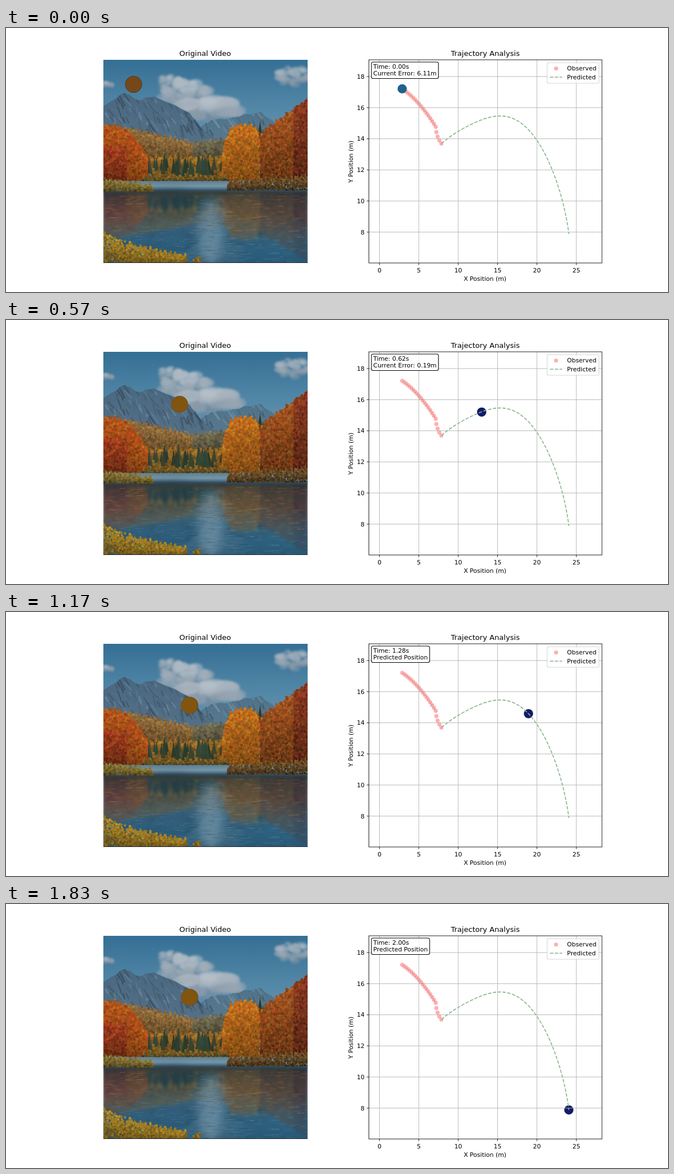
These frames come from a looping animation (1183x473 px, 1.86 s). An HTML page with a canvas:

```html
<!DOCTYPE html>
<html lang="en">
<head>
<meta charset="utf-8">
<title>Trajectory Analysis</title>
<style>
html, body { margin: 0; width: 100%; height: 100%; overflow: hidden; background: #fff; }
canvas, svg { position: absolute; left: 0; top: 0; }
#photo { left: 174px; top: 57px; }
text { font-family: "DejaVu Sans", sans-serif; font-size: 10.95px; fill: #000; }
.title { font-size: 13.14px; }
.mid { text-anchor: middle; }
.end { text-anchor: end; }
</style>
</head>
<body>
<canvas id="photo" width="365" height="364"></canvas>
<svg id="plot" width="1183" height="473" viewBox="0 0 1183 473"></svg>
<script>
const STEP = 30, FRAMES = 62;
const PX_X = 14.07, PX_Y = 27.87;          // pixels per metre
const LEFT = 174, RIGHT = 539, TOP = 57, BOTTOM = 421;
const plot = document.getElementById('plot');

/* ---------- landscape ---------- */
const photo = document.getElementById('photo');
const c = photo.getContext('2d');
c.translate(-LEFT, -TOP);
let seed = 7;
const rnd = () => (seed = (seed * 16807) % 2147483647) / 2147483647;
const between = (a, b) => a + (b - a) * rnd();
const repeat = (n, fn) => { for (let i = 0; i < n; i++) fn(i); };

function band(y0, y1, ...stops) {
  const g = c.createLinearGradient(0, y0, 0, y1);
  stops.forEach((s, i) => g.addColorStop(i / (stops.length - 1), s));
  c.fillStyle = g;
  c.fillRect(LEFT, y0, RIGHT - LEFT, y1 - y0);
}
function disc(x, y, rx, ry, fill) {
  c.fillStyle = fill;
  c.beginPath();
  c.ellipse(x, y, rx, ry, 0, 0, 7);
  c.fill();
}
function soft(px, draw) {
  c.save();
  c.filter = `blur(${px}px)`;
  draw();
  c.restore();
}
function cloud(x, y, rx, ry) {
  repeat(50, () => {
    const a = rnd() * 6.283, r = Math.sqrt(rnd());
    const dy = ry * r * Math.sin(a), s = between(.12, .3) * rx;
    const l = 66 - 9 * dy / ry + between(-4, 4);
    disc(x + rx * r * Math.cos(a), y + dy, s, s * .6, `hsl(208 15% ${l}% / .6)`);
  });
}
// A jagged slope through a few summits, scored with light and dark gullies.
function mountain(summits, base, hue, light) {
  c.save();
  c.beginPath();
  c.moveTo(summits[0][0], base);
  summits.forEach(([x, y], i) => {
    const [px, py] = summits[i - 1] || [x, y];
    for (let u = .2; u < 1; u += .2) c.lineTo(px + (x - px) * u, py + (y - py) * u + between(-2, 2));
    c.lineTo(x, y);
  });
  c.lineTo(summits.at(-1)[0], base);
  c.clip();
  band(summits[0][1] - 40, base, `hsl(${hue} 28% ${light}%)`, `hsl(${hue} 22% ${light + 5}%)`);
  repeat(260, () => {
    const x = between(summits[0][0], summits.at(-1)[0]), y = between(110, base), l = between(6, 22);
    c.strokeStyle = `hsl(${hue} 24% ${light + between(-15, 17)}% / .55)`;
    c.lineWidth = between(1, 4);
    c.beginPath();
    c.moveTo(x, y);
    c.lineTo(x + l * between(.2, .9), y + l);
    c.stroke();
  });
  c.restore();
}
// Foliage dabs between a crown line and the ground, darker towards the ground.
function grove(x0, x1, crown, base, hue, sat = 68, light = 40, size = 2.3) {
  const count = (x1 - x0) * (base - crown((x0 + x1) / 2)) / 3;
  repeat(count, () => {
    const x = between(x0, x1), top = crown(x) + 3 * Math.sin(x * .7) + 2 * Math.sin(x * 1.7);
    const depth = rnd(), l = light - 14 * depth + between(-7, 7);
    disc(x, top + (base - top) * depth, size * between(.6, 1.2), size, `hsl(${hue + between(-7, 7)} ${sat}% ${l}%)`);
  });
}
function conifer(x, base, h) {
  c.fillStyle = `hsl(${between(70, 170)} 18% ${between(18, 26)}%)`;
  c.beginPath();
  c.moveTo(x - h * .16, base);
  c.lineTo(x, base - h);
  c.lineTo(x + h * .16, base);
  c.fill();
}
function ripples(x0, x1, y0, y1, count, hue, sat) {
  repeat(count, () => {
    c.fillStyle = `hsl(${hue} ${sat}% ${between(22, 60)}% / .3)`;
    c.fillRect(between(x0, x1), between(y0, y1), between(4, 18), 1);
  });
}

function paintSky() {
  band(TOP, 275, '#356f95', '#5a8dab', '#7c9fb2');
  soft(2, () => {
    cloud(292, 100, 22, 15);
    cloud(320, 120, 45, 24);
    cloud(365, 145, 65, 16);
    cloud(515, 85, 30, 17);
    cloud(181, 102, 11, 5);
  });
}
function paintMountains() {
  soft(.6, () => {
    mountain([[345, 180], [365, 166], [408, 160], [452, 150], [478, 168], [510, 200]], 235, 204, 42);
    mountain([[174, 140], [212, 116], [236, 129], [265, 123], [328, 152], [355, 185], [385, 212]], 235, 207, 39);
    grove(174, 350, x => 172 + (x - 174) * .22, 242, 34, 42, 40);
    grove(335, 395, x => 207 - (x - 335) * .1, 240, 48, 18, 38);
  });
}
function paintForest() {
  soft(.6, () => {
    grove(240, 400, () => 233, 274, 36, 60, 38);
    repeat(45, () => conifer(between(250, 392), between(250, 266), between(16, 34)));
    repeat(3, i => conifer(449 + 5 * i, 225, 58 - 14 * Math.abs(i - 1)));
    grove(455, RIGHT, x => 190 - (x - 455) * .74, 280, 24, 68, 37);
    grove(515, RIGHT, x => 145 - (x - 515) * .6, 275, 15, 62, 34);
    grove(387, 452, x => 176 + 55 * ((x - 425) / 38) ** 4, 276, 30, 74, 43);
    grove(LEFT, 252, x => 178 + 55 * ((x - LEFT) / 78) ** 3, 278, 23, 74, 41);
    grove(LEFT, 215, () => 215, 275, 15, 68, 38);
  });
}
function paintLake() {
  c.save();
  c.beginPath();
  c.rect(LEFT, 274, RIGHT - LEFT, BOTTOM - 274);
  c.clip();
  soft(2, () => {
    c.translate(0, 526);
    c.scale(1, -.85);
    c.drawImage(photo, 0, 0, 365, 218, LEFT, TOP, 365, 218);
  });
  band(274, 292, '#587f96', '#7695a6', '#3e6178');
  band(292, BOTTOM, 'rgb(30 58 76 / .6)', 'rgb(32 75 102 / .45)', 'rgb(35 88 118 / .72)', 'rgb(36 83 112 / .9)');
  soft(9, () => {
    disc(366, 365, 22, 60, 'rgb(130 158 175 / .6)');
    disc(295, 305, 38, 14, 'rgb(38 60 72 / .6)');
  });
  soft(2, () => {
    c.fillStyle = 'rgb(38 58 70 / .75)';
    c.fillRect(LEFT, 290, 365, 6);
  });
  ripples(LEFT, RIGHT, 335, BOTTOM, 420, 203, 38);
  ripples(325, 400, 300, BOTTOM, 150, 205, 22);
  ripples(LEFT, 240, 298, 370, 60, 28, 55);
  ripples(392, 530, 298, 380, 100, 28, 50);
  c.restore();
}
function paintShore() {
  soft(.5, () => {
    grove(245, 398, () => 266, 273, 42, 48, 34, 1.8);
    grove(LEFT, 262, x => 272 + (x - LEFT) * .13, 292, 45, 52, 36, 1.8);
    grove(396, RIGHT, x => 277 - (x - 396) * .08, 290, 34, 46, 31, 1.8);
    grove(LEFT, 322, x => 358 + 52 * Math.sqrt((x - LEFT) / 150), BOTTOM, 43, 62, 41, 2);
    grove(335, 347, () => 411, BOTTOM, 43, 62, 38, 2);
  });
  c.fillStyle = '#20262a';
  c.fillRect(LEFT, 420, 365, 1);
}
[paintSky, paintMountains, paintForest, paintLake, paintShore].forEach(paint => paint());

/* ---------- motion ---------- */
// frame, x, y: the predicted path is the polynomial through these
const KEYS = [[0, 778.3, 207], [6, 801.3, 189.5], [19, 852.6, 163.5], [33, 909, 163.5], [52, 983.7, 274.5], [61, 1005.8, 369]];
const predicted = f => [1, 2].map(k => KEYS.reduce((sum, a) => sum
  + KEYS.reduce((term, b) => a === b ? term : term * (f - b[0]) / (a[0] - b[0]), a[k]), 0));

// A falling arc, then a short steep hook.
const LAST = 22, HOOK = 18;
const dots = Array.from({ length: LAST + 1 }, (_, i) => {
  const u = Math.min(i, HOOK) * 10 / 3, v = Math.max(0, i - HOOK) / (LAST - HOOK);
  return [708 + u + 10 * v ** 1.6, 109 + .669 * u + .00773 * u * u + 30 * v * (1.35 - .35 * v)];
});

const mix = (a, b, w) => a.map((v, i) => v + (b[i] - v) * w);
function observed(f) {
  const s = Math.min(f / 19, 1) * LAST, i = Math.min(Math.floor(s), LAST - 1);
  return mix(dots[i], dots[i + 1], s - i);
}
function marker(f) {
  const u = Math.min(1, Math.max(0, (f - 11) / 9));
  return mix(observed(f), predicted(f), u * u * (3 - 2 * u));
}

/* ---------- chart ---------- */
function set(el, attrs) {
  for (const k in attrs) el.setAttribute(k, attrs[k]);
  return el;
}
function add(tag, attrs, content = '') {
  const el = set(document.createElementNS('http://www.w3.org/2000/svg', tag), attrs);
  el.textContent = content;
  return plot.appendChild(el);
}
const label = (x, y, s, cls = '') => add('text', { x, y, class: cls }, s);
const line = (x1, y1, x2, y2, stroke) => add('line', { x1, y1, x2, y2, stroke, 'stroke-width': .88 });
const path = points => 'M' + points.map(p => p.map(v => v.toFixed(2))).join('L');
const dash = { fill: 'none', stroke: '#88b588', 'stroke-width': 1.64, 'stroke-dasharray': '6.08 2.63' };
const pinkDot = (cx, cy) => add('circle', { cx, cy, r: 3.7, fill: '#ffb0b0' });

label(356, 50, 'Original Video', 'title mid');
label(856.5, 50, 'Trajectory Analysis', 'title mid');
const ghost = add('circle', { r: 15, fill: '#694718' });
const videoBall = add('circle', { r: 14.8, 'stroke-width': 1 });

dots.forEach(p => pinkDot(...p));
const ball = add('circle', { r: 8.3 });
const xTicks = [0, 5, 10, 15, 20, 25].map(v => [v, 667.4 + v * PX_X]);
const yTicks = [8, 10, 12, 14, 16, 18].map(v => [v, 87 + (18 - v) * PX_Y]);
xTicks.forEach(([, x]) => line(x, 57, x, 421, '#b0b0b0'));
yTicks.forEach(([, y]) => line(648.5, y, 1065, y, '#b0b0b0'));
add('path', { d: path(dots.slice(0, HOOK + 1)), fill: 'none', stroke: '#7a3028', 'stroke-opacity': .65, 'stroke-width': 1.4, 'stroke-dasharray': '1.3 2.95', 'stroke-dashoffset': -1.5 });
add('path', { d: path(Array.from({ length: FRAMES }, (_, f) => predicted(f))), ...dash });
add('rect', { x: 648.5, y: 57, width: 416.5, height: 364, fill: 'none', stroke: '#000', 'stroke-width': .88 });
xTicks.forEach(([v, x]) => { line(x, 421, x, 424.8, '#000'); label(x, 437.6, v, 'mid'); });
yTicks.forEach(([v, y]) => { line(644.7, y, 648.5, y, '#000'); label(640.8, y + 4, v, 'end'); });
label(856, 453.3, 'X Position (m)', 'mid');
set(label(0, 0, 'Y Position (m)', 'mid'), { transform: 'translate(619.5 239.5) rotate(-90)' });

const box = add('rect', { x: 653, y: 61, height: 29.5, rx: 3.3, fill: '#fff', 'fill-opacity': .8, stroke: '#000', 'stroke-width': 1.1 });
const timeText = label(656.3, 72.8);
const stateText = label(656.3, 85.2);

add('rect', { x: 967, y: 62.3, width: 92.5, height: 36.7, rx: 2.2, fill: '#fff', 'fill-opacity': .8, stroke: '#ccc', 'stroke-opacity': .8, 'stroke-width': 1.1 });
pinkDot(983, 72.6);
add('path', { d: 'M972 88.3H994', ...dash });
label(1002.6, 76.4, 'Observed');
label(1002.6, 92.2, 'Predicted');

function draw() {
  const f = Math.floor(performance.now() % (STEP * FRAMES) / STEP);
  const early = f < 15, tracked = f < 20;

  const v = Math.min(f, 23), cx = 228 + 4.33 * v, cy = 101 + 1.465 * v + .0614 * v * v;
  set(videoBall, { cx, cy, fill: early ? '#74481a' : '#81540f', stroke: early ? '#51391d' : '#78501a' });
  set(ghost, { cx: cx + 1, cy, opacity: f >= 23 ? 1 : 0 });

  const at = marker(f), goal = predicted(f);
  set(ball, { cx: at[0], cy: at[1], fill: early ? '#1f628f' : '#141b68' });

  const error = Math.hypot((at[0] - goal[0]) / PX_X, (at[1] - goal[1]) / PX_Y);
  timeText.textContent = `Time: ${(f * 2 / 61).toFixed(2)}s`;
  stateText.textContent = tracked ? `Current Error: ${error.toFixed(2)}m` : 'Predicted Position';
  set(box, { width: stateText.getComputedTextLength() + 6.6 });
  requestAnimationFrame(draw);
}
draw();
</script>
</body>
</html>
```
